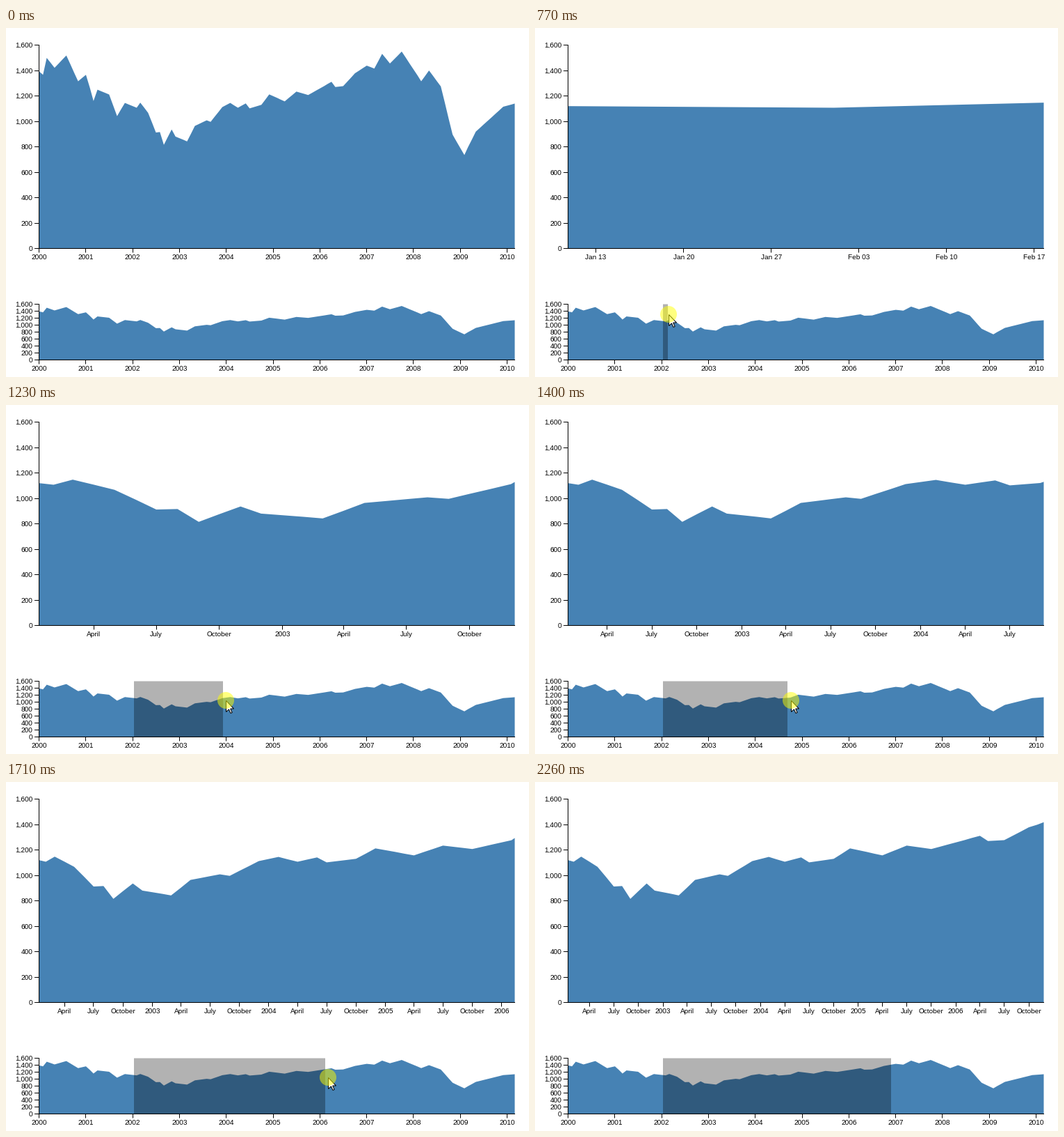
These frames come from a looping animation (752x501 px, 3.02 s). A matplotlib script:

```python
import numpy as np
import matplotlib.pyplot as plt
from matplotlib.animation import FuncAnimation
from matplotlib.collections import LineCollection
from matplotlib.patches import Circle, Polygon, Rectangle

W, H, DPI = 752, 501, 100
PX = 72 / DPI                      # one pixel in points
LOOP, TICK_MS = 3020, 10
LEFT, RIGHT = 47.5, 731.5
FOCUS_BASE, FOCUS_H = 316.5, 292
CONTEXT_BASE, CONTEXT_H = 476.5, 80
Y_MAX = 1600

START = np.datetime64("2000-01-01")
MONTHS = ("January February March April May June July August "
          "September October November December").split()
WEEKDAYS = "Sun Mon Tue Wed Thu Fri Sat".split()

# Turning points of the series as (month, value); straight in between
TURNS = [(0, 1394), (1, 1366), (2, 1499), (4, 1421), (7, 1518), (10, 1315),
         (12, 1366), (14, 1160), (15, 1249), (18, 1211), (20, 1041),
         (22, 1145), (25, 1107), (26, 1147), (28, 1067), (30, 912),
         (31, 916), (32, 815), (34, 936), (35, 880), (38, 842), (40, 964),
         (43, 1008), (44, 996), (47, 1112), (49, 1145), (51, 1107),
         (53, 1141), (54, 1102), (57, 1130), (59, 1212), (63, 1157),
         (66, 1234), (69, 1207), (75, 1311), (76, 1270), (78, 1277),
         (81, 1378), (84, 1438), (86, 1415), (88, 1531), (90, 1455),
         (93, 1549), (98, 1315), (100, 1400), (103, 1275), (106, 896),
         (109, 735), (112, 919), (119, 1115), (122, 1140)]
month_index = np.arange(TURNS[-1][0] + 1)
values = np.interp(month_index, *zip(*TURNS))
month_starts = np.datetime64("2000-01") + month_index
dates = (month_starts.astype("M8[D]") - START).astype(int)
SPAN = dates[-1]

# The screen refreshes in steps while the pointer approaches and drags
APPEAR, APPROACH_STEP, APPROACH_COUNT = 70, 76, 5
PRESS, DRAG_STEP = 614, 77
RELEASE_STEP, LEAVE = 18, 2260
ENTRY, GRAB, EXIT = np.array([441, 453]), np.array([184, 410]), (613, 462)
DRAG_STEPS = [0, 5, 8, 12, 16, 17]
BRUSH_X = [184, 238, 312, 414, 504, 512]
POINTER_X = [184, 246, 316, 420, 506, 514]
ARROW = np.array([(0, 0), (0, 16), (4, 12.4), (6.5, 18), (8.6, 17),
                  (6.2, 11.5), (11, 11.5)]) + 0.5

plt.rcParams.update({"font.family": "Liberation Sans",
                     "text.hinting": "native"})
fig = plt.figure(figsize=(W / DPI, H / DPI), dpi=DPI, facecolor="white")
ax = fig.add_axes([0, 0, 1, 1])
ax.set(xlim=(0, W), ylim=(H, 0))
ax.axis("off")


def to_x(days, lo=0, hi=SPAN):
    """Time scale clamped to the plot's edges."""
    x = LEFT + (days - lo) / (hi - lo) * (RIGHT - LEFT)
    return np.clip(x, LEFT, RIGHT)


def to_days(x):
    return (x - LEFT) / (RIGHT - LEFT) * SPAN


def area_points(base, height, lo=0, hi=SPAN):
    x = to_x(dates, lo, hi)
    y = base - values / Y_MAX * height
    return np.column_stack([np.r_[x[0], x, x[-1]], np.r_[base, y, base]])


def add_area(points):
    return ax.add_patch(Polygon(points, color="steelblue", lw=0, zorder=1))


def add_lines(segments):
    lines = LineCollection(segments, colors="black", linewidths=PX,
                           snap=False, zorder=3)
    return ax.add_collection(lines, autolim=False)


def add_label(x, y, text, align):
    return ax.text(x, y, text, size=10 * PX, ha=align, va="baseline", zorder=4)


def tick_segments(xs, base):
    return [[(np.floor(x) + 0.5, base), (np.floor(x) + 0.5, base + 6)]
            for x in xs]


def add_frame(base, height):
    """Axis lines with the value ticks and labels."""
    segments = [[(LEFT, base - height - 0.5), (LEFT, base + 0.5)],
                [(LEFT - 0.5, base), (RIGHT + 0.5, base)]]
    for value in range(0, Y_MAX + 1, 200):
        row = np.floor(base - value / Y_MAX * height)
        segments.append([(LEFT - 6.5, row + 0.5), (LEFT, row + 0.5)])
        add_label(LEFT - 9, row + 4, f"{value:,}", "right")
    add_lines(segments)


def time_ticks(lo, hi):
    """Tick days and labels at the calendar step nearest a tenth of the span."""
    days = np.arange(np.ceil(lo), np.floor(hi) + 1).astype(int)
    stamps = START + days
    months = stamps.astype("M8[M]")
    month = months.astype(int) % 12
    day = (stamps - months).astype(int) + 1
    weekday = (stamps.astype(int) + 4) % 7
    first = day == 1
    keep = [day > 0, day % 2 == 1, weekday == 0, first,
            first & (month % 3 == 0), first & (month == 0)]
    lengths = np.array([1, 2, 7, 30, 90, 365])
    level = np.argmin(np.abs(np.log(lengths * 10 / (hi - lo))))

    def label(i):
        if day[i] != 1:
            name = WEEKDAYS[weekday[i]] if weekday[i] else MONTHS[month[i]][:3]
            return f"{name} {day[i]:02d}"
        return MONTHS[month[i]] if month[i] else str(months[i])[:4]

    chosen = np.flatnonzero(keep[level])
    return days[chosen], [label(i) for i in chosen]


focus = add_area(area_points(FOCUS_BASE, FOCUS_H))
add_area(area_points(CONTEXT_BASE, CONTEXT_H))
add_frame(FOCUS_BASE, FOCUS_H)
add_frame(CONTEXT_BASE, CONTEXT_H)

years, year_names = time_ticks(0, SPAN)
add_lines(tick_segments(to_x(years), CONTEXT_BASE))
for x, name in zip(to_x(years), year_names):
    add_label(x, CONTEXT_BASE + 15.6, name, "center")

focus_ticks = add_lines([])
focus_labels = [add_label(0, FOCUS_BASE + 15.6, "", "center")
                for _ in range(26)]
ax.add_patch(Rectangle((741, 0), W - 741, H, color="white", lw=0, zorder=5))

brush = ax.add_patch(Rectangle((GRAB[0], CONTEXT_BASE - CONTEXT_H), 0,
                               CONTEXT_H, color="black", alpha=0.3, lw=0,
                               snap=False, zorder=2))
arrow = ax.add_patch(Polygon(ARROW, facecolor="white", edgecolor="black",
                             linewidth=PX, joinstyle="miter", zorder=6))
halo = ax.add_patch(Circle((0, 0), 12, color="yellow", alpha=0.5, lw=0,
                           zorder=7))


def drag_position(step, xs):
    """The drag speeds up over its first steps, then runs steadily."""
    start = DRAG_STEPS[1]
    if step < start:
        step = start * (step / start) ** 2.2
    return np.round(np.interp(step, DRAG_STEPS, xs))


def pointer_at(now, step):
    if step < 0:
        u = (now - APPEAR) // APPROACH_STEP / APPROACH_COUNT
        eased = 1 - (1 - np.clip(u, 0, 1)) ** 1.8
        return ENTRY + (GRAB - ENTRY) * eased
    x = drag_position(step, POINTER_X)
    tip = np.array([x, GRAB[1] + 14 * min(1, (x - GRAB[0]) / 110)])
    u = np.clip((step - RELEASE_STEP) / 2, 0, 1)
    return tip + (EXIT - tip) * u


def show_focus(lo, hi):
    focus.set_xy(area_points(FOCUS_BASE, FOCUS_H, lo, hi))
    days, names = time_ticks(lo, hi)
    xs = to_x(days, lo, hi)
    focus_ticks.set_segments(tick_segments(xs, FOCUS_BASE))
    for i, text in enumerate(focus_labels):
        text.set_visible(i < len(xs))
        if i < len(xs):
            text.set_x(xs[i])
            text.set_text(names[i])


def update(frame):
    now = frame * TICK_MS
    step = (now - PRESS) // DRAG_STEP

    brushing = step > 0
    brush.set_visible(brushing)
    if brushing:
        end = drag_position(step, BRUSH_X)
        brush.set_width(end - GRAB[0])
        show_focus(to_days(GRAB[0]), to_days(end))
    else:
        show_focus(0, SPAN)

    tip = np.round(pointer_at(now, step))
    arrow.set_visible(APPEAR <= now < LEAVE)
    arrow.set_xy(ARROW + tip)
    halo.set_visible(0 <= step < RELEASE_STEP)
    halo.center = tuple(tip)
    return focus, focus_ticks, brush, arrow, halo, *focus_labels


anim = FuncAnimation(fig, update, frames=LOOP // TICK_MS, interval=TICK_MS,
                     repeat=True, repeat_delay=0, blit=False)
plt.show()
```
